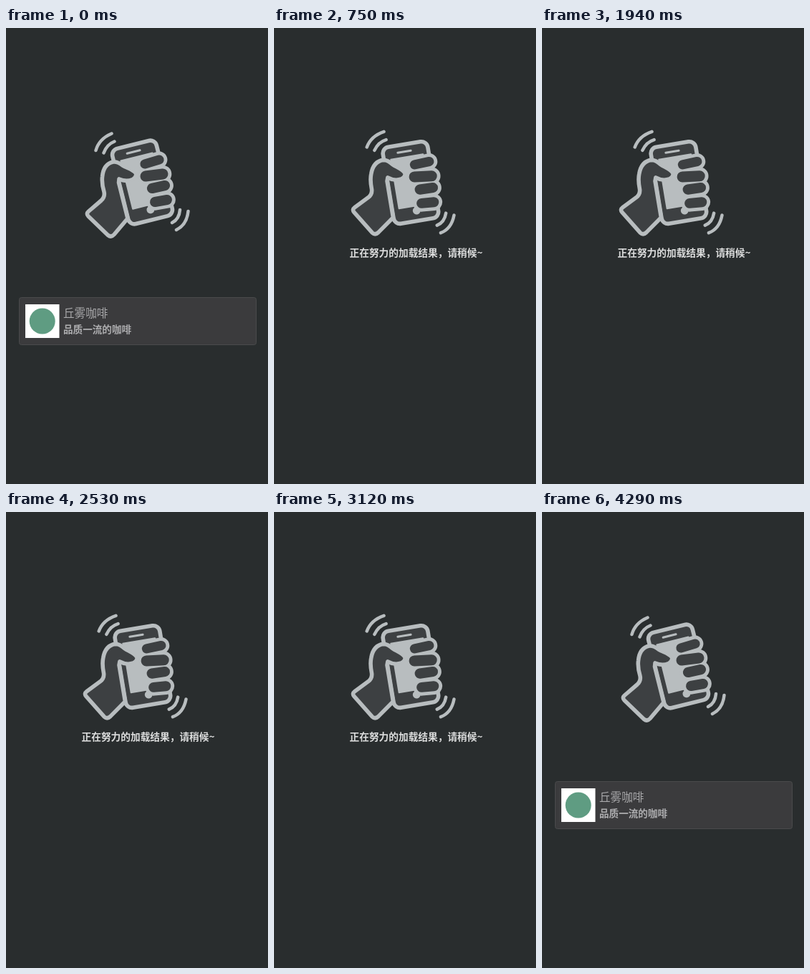
Animation of 366 by 637 pixels, one loop 4920 ms. Source, as an HTML page:

```html
<!DOCTYPE html>
<html lang="zh-CN">
<head>
<meta charset="utf-8">
<title>Shake to search</title>
<style>
  html, body { margin: 0; width: 100%; height: 100%; overflow: hidden; background: #292d2e; }
  svg { display: block; width: 100%; height: 100%; }
  text { font-family: "Noto Sans CJK SC", "Noto Sans CJK", sans-serif; font-weight: 500; }
  .line { fill: none; stroke: #b8bdbf; stroke-width: 4.5; stroke-linecap: round; stroke-linejoin: round; }
  .solid { fill: #3d4042; stroke-width: 5.6; }
  .light { fill: #b8bdbf; }
  .bold { font-weight: 700; }
</style>
</head>
<body>
<svg viewBox="0 0 366 637">
  <g id="hand">
    <g transform="translate(190.5 215.5) rotate(-14)">
      <rect class="line solid" x="-31.7" y="-54.2" width="63.4" height="108.4" rx="9"/>
      <rect class="light" x="-23" y="-37.5" width="47.5" height="71.5" rx="1"/>
      <rect class="light" x="-12.5" y="-45.7" width="21.5" height="3" rx="1.5"/>
      <circle class="light" cx="1.8" cy="40" r="5.4"/>
    </g>
    <g id="fingers" fill="none" stroke-linecap="round"></g>
    <path class="line solid" d="M170 266L151 288.500Q147 293 142.500 289.500L115 263Q111.500 259.500 115.500 256L133 241
      Q138.500 236 137 229Q133.500 217 134.500 208Q136 190 150 187Q156 186.500 163 192
      C169 195.500 178 197.500 181.500 203Q183 207.500 177 211.500Q168 215.500 158 211L157.500 216Z"/>
    <path class="line" d="M125.500 171Q130 155 147.500 147.500M136.500 174.500Q141 162.500 151.500 158.500
      M232 272Q242 267 243 254M238 282Q252.500 275 254.500 256"/>
  </g>
  <text id="loading" class="bold" x="105.500" y="318.500" font-size="13.7" fill="#dcdddd">正在努力的加载结果，请稍候~</text>
  <g id="card">
    <rect x="18.500" y="376.500" width="331" height="66" rx="3" fill="#3b3b3d" stroke="#4a4b4c"/>
    <rect x="27" y="386" width="47.500" height="47" fill="#fff"/>
    <circle cx="50.700" cy="409.500" r="18" fill="#5f9c82"/>
    <text x="80" y="403.500" font-size="15.6" fill="#a9a9ab">丘雾咖啡</text>
    <text class="bold" x="80" y="426" font-size="13.6" fill="#adadaf">品质一流的咖啡</text>
  </g>
</svg>
<script>
const LOOP = 4920, START = 450, STOP_TICK = 19, LAST_TICK = 26;
const el = id => document.getElementById(id);
const hand = el('hand'), loading = el('loading'), card = el('card');

// Each finger: path and thickness, drawn as a light rim with a dark pill on top
const fingers = [['M194 190L214 184', 13.2], ['M195 207L219 204', 15],
                 ['M204 224L222 220', 14.2], ['M208 243L225 240', 14]];
const strokes = (color, extra) => fingers.map(([d, w]) =>
  `<path d="${d}" stroke="${color}" stroke-width="${w + extra}"/>`).join('');
el('fingers').innerHTML = strokes('#b8bdbf', 9.6) + strokes('#3d4042', 0);

function draw(now) {
  // The motion advances in ticks of just under 150 ms
  const since = now % LOOP - START;
  const tick = Math.min(LAST_TICK, Math.floor(Math.max(since / 150, (since - 16) / 147)));
  const shaking = tick >= 0 && tick < STOP_TICK;
  const angle = shaking ? 4.6 + 5.4 * Math.sin(tick * Math.PI / 2) : 0;
  hand.setAttribute('transform', `rotate(${angle} 184 221)`);
  loading.setAttribute('visibility', shaking ? 'visible' : 'hidden');

  // The card drops in and fades up once the shaking ends
  const left = tick < 0 ? 0 : Math.min(1, (LAST_TICK - tick) / (LAST_TICK - STOP_TICK)) ** 2;
  card.setAttribute('transform', `translate(0 ${-18 * left})`);
  card.setAttribute('opacity', 1 - left);
}

function frame() {
  draw(performance.now());
  requestAnimationFrame(frame);
}
frame();
</script>
</body>
</html>
```
